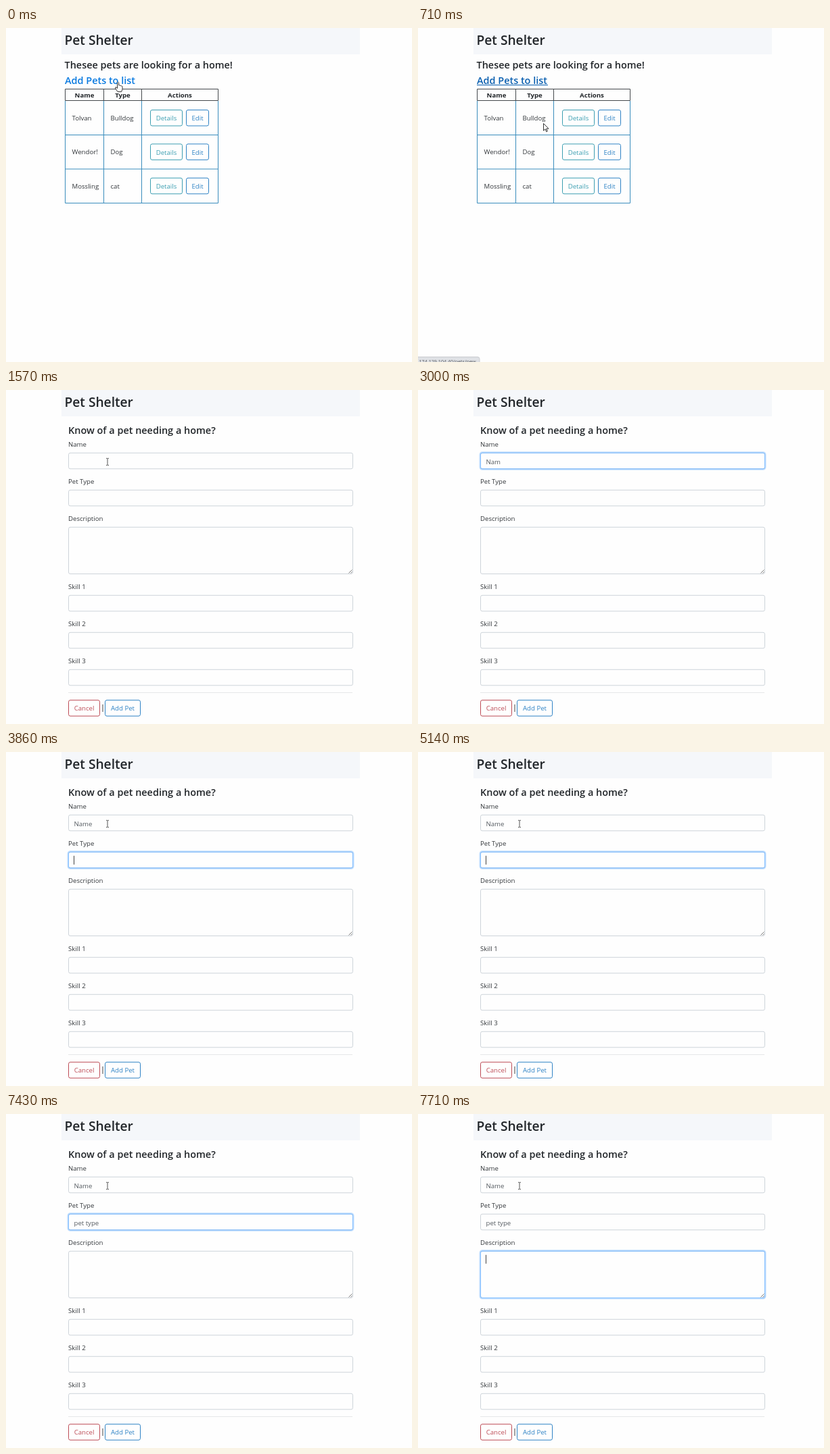
An HTML page that plays this animation: 600x495 px, repeating every 8000 ms.

```html
<!DOCTYPE html>
<html lang="en">
<head>
<meta charset="utf-8">
<title>Pet Shelter</title>
<style>
html, body { margin: 0; width: 100%; height: 100%; overflow: hidden; background: #fefefe; }
svg { display: block; width: 600px; height: 495px; }
text { font: 9.65px "Open Sans", "Noto Sans", sans-serif; fill: #33373b; white-space: pre; }
.h1 { font-size: 19.2px; font-weight: 600; fill: #212529; }
.h2 { font-size: 14.45px; font-weight: 600; fill: #212529; }
.th { font-weight: 700; text-anchor: middle; fill: #212529; }
.mid { text-anchor: middle; }
.val { fill: #555b61; }
.url { font-size: 7.15px; fill: #55585c; }
path, rect { fill: none; }
</style>
</head>
<body>
<svg id="stage" viewBox="0 0 600 495"></svg>
<script>
const TEAL = '#3d9fb2', BLUE = '#2f83c5', RED = '#bd4c56';
const LOOP = 8000, FPS = 7;

const text = (x, y, s, cls = '') => `<text x="${x}" y="${y}" class="${cls}">${s}</text>`;
const box = (x, y, w, h, r, stroke, extra = '') =>
  `<rect x="${x}" y="${y}" width="${w}" height="${h}" rx="${r}" stroke="${stroke}" ${extra}/>`;
const line = (d, stroke) => `<path d="${d}" stroke="${stroke}"/>`;
const button = (x, y, w, label, color) =>
  box(x, y, w, 23.5, 2.5, color) +
  `<text x="${x + w / 2}" y="${y + 15.7}" class="mid" style="fill:${color}">${label}</text>`;

// Pet list page
const pets = [['Tolvan', 'Bulldog'], ['Wendor!', 'Dog'], ['Mossling', 'cat']];
const list =
  text(86.5, 59.5, 'Thesee pets are looking for a home!', 'h2') +
  `<text id="link" x="87" y="82.5" class="h2">Add Pets to list</text>` +
  `<path id="underline" d="M87 84.5H192" stroke="#0a5fb0" stroke-width="1.2"/>` +
  line('M87.5 108V259.5H313.5V108M144.5 108V259M200.5 108V259M87 158.5H313M87 209H313', '#3a8dbd') +
  line('M87.5 107.5V90.5H313.5V107.5ZM144.5 90V108M200.5 90V108', '#45494d') +
  text(116, 103, 'Name', 'th') + text(172.5, 103, 'Type', 'th') + text(257, 103, 'Actions', 'th') +
  pets.map(([name, type], i) => {
    const y = 121.5 + 50.4 * i;
    return text(97.5, y + 15.5, name) + text(154.5, y + 15.5, type) +
      button(213.5, y, 47, 'Details', TEAL) + button(266.5, y, 33, 'Edit', BLUE);
  }).join('');

// Form page
const fields = [
  ['Name', 93.3, 23.5], ['Pet Type', 148.3, 23.5], ['Description', 203.3, 69.2],
  ['Skill 1', 304.3, 23.5], ['Skill 2', 359.3, 23.5], ['Skill 3', 414.3, 23.5]
];
const form =
  text(92, 64.5, 'Know of a pet needing a home?', 'h2') +
  fields.map(([label, y, h], i) =>
    text(92, y - 9.3, label) + box(92.5, y, 420, h, 2.5, '#ced4da') +
    `<g id="ring${i}">` +
    box(91.5, y - 1, 422, h + 2, 3.5, '#007bff', 'stroke-width="2" stroke-opacity=".25"') +
    box(92.5, y, 420, h, 2.5, '#80bdff') + '</g>' +
    `<text id="val${i}" class="val" x="100.5" y="${y + 16.2}"></text>`
  ).join('') +
  line('M506.5 271.5L511.5 266.5M509.5 271.5L511.5 269.5', '#777') +
  line('M92 448.5H512', '#e6e7e8') +
  button(92.5, 459.7, 46, 'Cancel', RED) + line('M143 466V477', '#444') +
  button(146.5, 459.7, 52, 'Add Pet', BLUE) +
  '<path id="caret" stroke="#444"/>';

const pointers =
  `<g id="mouse" stroke-linejoin="round">
    <path id="arrow" d="M0 0V10.6L2.5 8.3L4.2 12.2L5.8 11.5L4.1 7.7H7.5Z" stroke="#333" style="fill:#fff"/>
    <path id="hand" d="M-1 1Q0 -1 1.2 1V5Q2.4 4.2 3.2 5.4Q4.4 4.7 5 6Q6.3 5.6 6.5 7V10.5L5.2 14.5H-.5L-4 9.2Q-4.3 7.3 -2.6 7.8L-1 9.4Z" stroke="#333" style="fill:#fff"/>
    <path id="beam" d="M-2 -5H-.6L0 -4.4L.6 -5H2M0 -4.4V4.6M-2 5.2H-.6L0 4.6L.6 5.2H2" stroke="#555"/>
  </g>`;

document.getElementById('stage').innerHTML =
  '<rect x="82" width="441" height="39" style="fill:#f5f7fa"/>' +
  text(86.5, 25, 'Pet Shelter', 'h1') +
  `<g id="list">${list}</g><g id="form">${form}</g>` +
  `<g id="status"><path d="M-1 496V487.5H88Q91 487.5 91 490.5V496Z" stroke="#c9cbce" style="fill:#dfe1e5"/>` +
  text(1.5, 496.5, '174.129.104.40/pets/new', 'url') + '</g>' + pointers;

const $ = id => document.getElementById(id);
const show = (id, on) => $(id).setAttribute('visibility', on ? 'inherit' : 'hidden');
const clamp = v => Math.max(0, Math.min(1, v));
const within = (k, spans) => spans.some(([a, b]) => k >= a && k < b);
const latest = (k, keys) => keys.reduce((v, [at, s]) => k >= at ? s : v, '');

// All times below are in ticks of 1/7 s
const typed = [
  [[18, 'N'], [19, 'Na'], [20, 'Nam'], [23, 'Name']],
  [[39, 'p'], [40, 'pe'], [41, 'pet'], [42, 'pet ty'], [44, 'pet typ'], [46, 'pet type']],
  []
];
const focus = [[12, 26], [26, 53], [53, 99]];
const caretOn = [[12, 15], [18, 21], [23, 30], [33, 37], [39, 50], [53, 56]];

function draw(ms) {
  const k = Math.floor((ms % LOOP + 5) * FPS / 1000);
  const onForm = k >= 7, hover = k >= 1;
  show('list', !onForm);
  show('form', onForm);
  show('underline', hover && !onForm);
  show('status', hover && k < 10);
  $('link').style.fill = hover ? '#0a5fb0' : '#0a7ae0';

  fields.forEach((f, i) => {
    const [from, to] = focus[i] || [99, 99];
    $('ring' + i).setAttribute('opacity', clamp((k - from + 1) / 2) - clamp((k - to + 1) / 2));
    $('val' + i).textContent = latest(k, typed[i] || []);
  });

  const active = Math.max(0, focus.findIndex(([a, b]) => k >= a && k < b));
  const x = 100.5 + $('val' + active).getComputedTextLength();
  $('caret').setAttribute('d', `M${x} ${fields[active][1] + 5.5}v13`);
  show('caret', onForm && within(k, caretOn));

  const away = clamp((k - 1) / 4), back = clamp((k - 8) / 3);
  const mx = 165.5 + 20 * away - 35.5 * back, my = 80 + 61.5 * away - 35.2 * back;
  $('mouse').setAttribute('transform', `translate(${mx} ${my})`);
  show('mouse', !within(k, [[18, 23]]));
  show('hand', k < 2);
  show('arrow', k >= 2 && k < 11);
  show('beam', k >= 11);
}

function tick() {
  draw(performance.now());
  requestAnimationFrame(tick);
}
tick();
</script>
</body>
</html>
```
